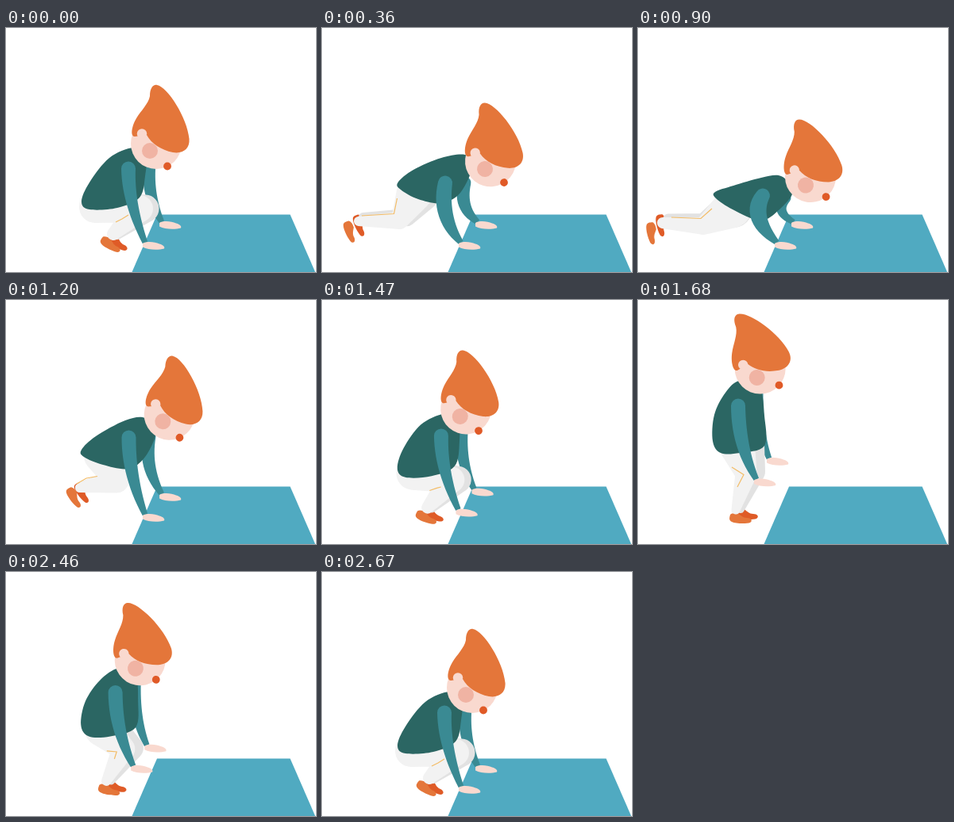
An HTML page for the animation above (2700 ms loop, 390 px wide and 308 px high).

```html
<!DOCTYPE html>
<html lang="en">
<head>
<meta charset="utf-8">
<title>Burpee</title>
<style>
  html, body { margin: 0; width: 100%; height: 100%; overflow: hidden; background: #fff; }
  svg { display: block; width: 100%; height: 100%; }
</style>
</head>
<body>
<svg id="stage" viewBox="0 0 390 308">
  <path fill="#50aac1" d="M190 235.5H357.5L389 308H158.500Z"/>
  <path id="farArm" fill="#3a8a93"/>
  <path id="farHand" fill="#f9d9cf" class="hand"/>
  <path id="farFoot" fill="#df5b27" class="foot"/>
  <path id="farLeg" fill="#e2e2e2"/>
  <path id="nearFoot" fill="#e4763a" class="foot"/>
  <path id="nearLeg" fill="#f2f2f2"/>
  <path id="stripe" fill="none" stroke="#f3bc66" stroke-width="1.2"/>
  <path id="torso" fill="#2b6663"/>
  <path id="nearArm" fill="#3a8a93"/>
  <path id="nearHand" fill="#f9d9cf" class="hand"/>
  <g id="head">
    <circle cx="189" cy="146" r="32" fill="#f9d9cf"/>
    <path fill="#e4763a" d="M162 137C156 137 158 124 164 114C170 104 179 96 181 86C181 76 185 71 190 72C203 74 228 113 230.500 140C231.500 153 222 159 210 157C195 154 183 146 177 135Z"/>
    <circle cx="171" cy="133.500" r="6.200" fill="#f9d9cf"/>
    <circle cx="181" cy="155" r="10" fill="#f0b3a3"/>
    <circle cx="203" cy="174.500" r="4.900" fill="#e05a27"/>
  </g>
</svg>
<script>
const LOOP = 2700, STEP = 30;
const el = {};
document.querySelectorAll('[id]').forEach(n => el[n.id] = n);
const HAND = 'M-3 1C1 -2 12 -1.500 18 1.500C23 3 25 5 24 7.500C17 9.500 4 9.500 -3 5.500Z';
const FOOT = 'M-13 -4.500C-14 -.5 -15 2.500 -11 4.500C-6 7 8 7 12 5.500C16 3 13 -.5 8 -.5C3 -.5 0 -4 -3 -6C-7 -7 -11 -6.500 -13 -4.500Z';
document.querySelectorAll('.hand').forEach(n => n.setAttribute('d', HAND));
document.querySelectorAll('.foot').forEach(n => n.setAttribute('d', FOOT));

// torso: outline points; head: cheek x, y, tilt; arms: shoulder, elbow, wrist, elbow radius
// legs: hip, knee, ankle (x, y, radius each); feet: near x, y, far x, y, angle
const crouch = {
  torso: [160,151, 130,164, 105,195, 95,219, 105,229, 140,227, 168,214, 175,187, 176,160],
  head: [181,155,0],
  nearArm: [154,177.5, 159,222, 175,271, 7],
  farArm: [180.5,178, 183,212, 196,245, 7],
  nearLeg: [112,226,20, 168,228,17, 135,260,8],
  farLeg: [116,226,19, 175,228,17.5, 140,260,7],
  feet: [132,273, 141,271, 24],
  stripe: [138,245, 146,241, 154,236]
};
const tuck = {
  torso: [175,149, 150,152, 113,172, 95,189, 98,198, 122,208, 154,213, 175,198, 188,168],
  head: [197.3,153.3,2.5],
  nearArm: [154.5,173.5, 159.5,222, 175,271, 7.5],
  farArm: [181,172, 180.5,209, 196,245, 7.5],
  nearLeg: [117,197,19, 139,228,15.5, 93,237,6],
  farLeg: [118,198,18, 139,228,15, 99,234,6],
  feet: [86.5,249, 96.5,243, 50],
  stripe: [89,232, 101,225, 115,222.5]
};
const kick = {
  torso: [180,160, 150,164, 115,179, 95.5,195, 99,204, 121,216, 150,221, 174,208, 190,173],
  head: [205,178,-6.2],
  nearArm: [155,195.5, 156,236, 175,271, 9],
  farArm: [180,195, 179.5,223, 196,245, 7.5],
  nearLeg: [116,209,22.5, 98,243,11, 46,244,6],
  farLeg: [126,209,22, 107,239,11, 52,239,6],
  feet: [36,257, 48,249, 62],
  stripe: [94.5,215, 90.5,234.5, 50,237]
};
const plank = {
  torso: [180,187, 155,189, 120,199, 97,207, 98,215, 119,229, 154,243, 178,229, 195,206],
  head: [211,198.5,-11.9],
  nearArm: [157,211.5, 152.5,240, 175,271, 10],
  farArm: [185,214, 181,231, 196,245, 6],
  nearLeg: [118,228,24.5, 82,250,11, 31,246,7],
  farLeg: [120,228,24, 82,244,10, 38,241,6.5],
  feet: [18,259, 30,249, 73],
  stripe: [42,239, 79,240.5, 93,228]
};
const rise = {
  torso: [128,102, 110,117, 96,145, 94,178, 104,193, 128,193, 159,184, 159,146, 153,112],
  head: [149.7,98,-22.5],
  nearArm: [126,133.5, 132,183, 149,226.5, 7.8],
  farArm: [150,118, 154,163, 165,200, 6],
  nearLeg: [124,182,23, 136,219,13.5, 123,265,5.5],
  farLeg: [137,182,22, 146,217,14, 129,264,5],
  feet: [129,275.5, 137,270.5, 0],
  stripe: [118,211, 133,220.5, 125,236]
};
const tall = {
  torso: [118,90, 104,104, 93,138, 95,172, 106,184, 130,182, 156,175, 152,134, 146,98],
  head: [139.7,81,-29.5],
  nearArm: [118,120, 123.5,170, 140,213.5, 7.8],
  farArm: [143,105, 147,150, 158,187, 6],
  nearLeg: [123,176,22.5, 131,213,14, 124,264,6],
  farLeg: [132,176,22, 138,211,14.5, 130,262,5],
  feet: [129,275.5, 137,270.5, 0],
  stripe: [110,198, 124,219.5, 119,238]
};

const parts = Object.keys(crouch);
const mix = (a, b, k) => Object.fromEntries(
  parts.map(p => [p, a[p].map((v, i) => v + (b[p][i] - v) * k)]));

const hop = mix(crouch, tuck, .3);
hop.head[1] -= 6;

const low = mix(plank, plank, 0);
low.torso = low.torso.map((v, i) => i % 2 ? v + (i > 4 && i < 10 ? 3 : 6) : v);
low.head[0] += 1.5;
low.head[1] += 7;
low.nearArm = [158,218, 150,244, 175,271, 10];
low.farArm[1] += 6;
low.farArm[3] += 3;

const stand = mix(rise, tall, 1.3);

const keys = [
  [0, crouch], [95, hop], [190, tuck], [360, kick], [490, plank], [695, low],
  [900, plank], [1030, kick], [1200, tuck], [1295, hop], [1390, crouch],
  [1680, rise], [1800, tall], [1920, stand], [2220, stand], [2250, tall],
  [2350, rise], [2670, crouch], [LOOP, crouch]
];

// Monotone cubic interpolation through the keys.
function poseAt(t) {
  let n = 0;
  while (n < keys.length - 2 && t >= keys[n + 1][0]) n++;
  const [t0, a] = keys[n], [t1, b] = keys[n + 1];
  const h = t1 - t0, u = (t - t0) / h;
  const slope = (k, p, i) => k < 0 || k > keys.length - 2 ? 0 :
    (keys[k + 1][1][p][i] - keys[k][1][p][i]) / (keys[k + 1][0] - keys[k][0]);
  const tangent = (k, p, i) => {
    const l = slope(k - 1, p, i), r = slope(k, p, i);
    return l * r <= 0 ? 0 : 2 * l * r / (l + r);
  };
  const s = u * u * (3 - 2 * u);
  return Object.fromEntries(parts.map(p => [p, a[p].map((v, i) =>
    v + (b[p][i] - v) * s
      + h * u * (1 - u) * ((1 - u) * tangent(n, p, i) - u * tangent(n + 1, p, i)))]));
}

const fix = v => v.toFixed(2);
const pt = (x, y) => fix(x) + ' ' + fix(y);

function blob(c) {
  const n = c.length / 2;
  const at = i => { const j = (i + n) % n; return [c[2 * j], c[2 * j + 1]]; };
  let d = 'M' + pt(...at(0));
  for (let i = 0; i < n; i++) {
    const [a, b, e, f] = [at(i - 1), at(i), at(i + 1), at(i + 2)];
    d += 'C' + pt(b[0] + (e[0] - a[0]) / 6, b[1] + (e[1] - a[1]) / 6)
       + ' ' + pt(e[0] - (f[0] - b[0]) / 6, e[1] - (f[1] - b[1]) / 6)
       + ' ' + pt(...e);
  }
  return d + 'Z';
}

function capsule(x1, y1, r1, x2, y2, r2) {
  const dx = x2 - x1, dy = y2 - y1;
  const a = Math.atan2(dy, dx), b = Math.acos((r1 - r2) / Math.hypot(dx, dy));
  const on = (x, y, r, g) => pt(x + r * Math.cos(g), y + r * Math.sin(g));
  const arc = (r, big) => `A${fix(r)} ${fix(r)} 0 ${big ? 1 : 0} 0 `;
  const wide = b > Math.PI / 2;
  return 'M' + on(x1, y1, r1, a + b) + 'L' + on(x2, y2, r2, a + b)
    + arc(r2, wide) + on(x2, y2, r2, a - b) + 'L' + on(x1, y1, r1, a - b)
    + arc(r1, !wide) + on(x1, y1, r1, a + b) + 'Z';
}

const leg = l => capsule(...l.slice(0, 6)) + capsule(...l.slice(3));

function arm([sx, sy, mx, my, wx, wy, rm], rs) {
  const cx = 2 * mx - (sx + wx) / 2, cy = 2 * my - (sy + wy) / 2;
  const rw = 3.4, rc = 2 * rm - (rs + rw) / 2, N = 14;
  const left = [], right = [];
  for (let i = 0; i <= N; i++) {
    const u = i / N, v = 1 - u;
    const q = (a, b, c) => v * v * a + 2 * u * v * b + u * u * c;
    const dx = v * (cx - sx) + u * (wx - cx), dy = v * (cy - sy) + u * (wy - cy);
    const k = q(rs, rc, rw) / Math.hypot(dx, dy);
    const x = q(sx, cx, wx), y = q(sy, cy, wy);
    left.push(pt(x - dy * k, y + dx * k));
    right.unshift(pt(x + dy * k, y - dx * k));
  }
  return 'M' + left.concat(right).join('L') + `A${rs} ${rs} 0 0 0 ${left[0]}Z`;
}

const shape = (id, d) => el[id].setAttribute('d', d);
const place = (id, x, y, a = 0) =>
  el[id].setAttribute('transform', `translate(${pt(x, y)}) rotate(${fix(a)})`);

function draw(t) {
  const p = poseAt(t);
  shape('torso', blob(p.torso));
  for (const side of ['near', 'far']) {
    const a = p[side + 'Arm'];
    shape(side + 'Arm', arm(a, side === 'near' ? 9 : 7.5));
    place(side + 'Hand', a[4], a[5]);
    shape(side + 'Leg', leg(p[side + 'Leg']));
  }
  const [nx, ny, fx, fy, turn] = p.feet;
  place('nearFoot', nx, ny, turn);
  place('farFoot', fx, fy, turn);
  const s = p.stripe;
  shape('stripe', 'M' + pt(s[0], s[1]) + 'L' + pt(s[2], s[3]) + 'L' + pt(s[4], s[5]));
  const [hx, hy, tilt] = p.head;
  el.head.setAttribute('transform',
    `translate(${pt(hx, hy)}) rotate(${fix(tilt)}) translate(-181 -155)`);
}

const start = performance.now();
function tick() {
  const t = (performance.now() - start) % LOOP;
  draw(Math.floor(t / STEP) * STEP);
  requestAnimationFrame(tick);
}
tick();
</script>
</body>
</html>
```
